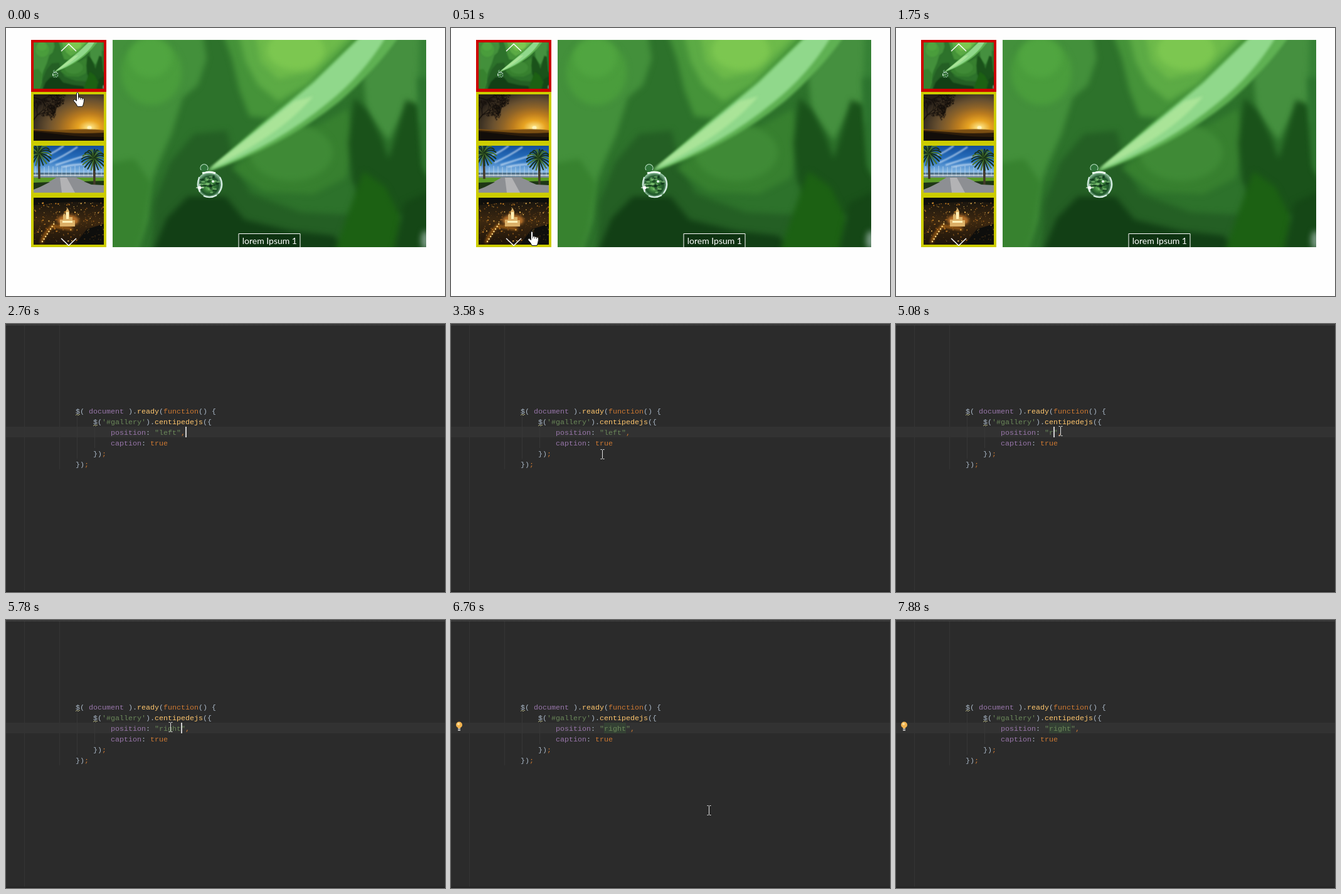
Recreate the animation shown at these times as an HTML page with a canvas. Size 700 px wide and 428 px high, loop 8000 ms.

```html
<!DOCTYPE html>
<html lang="en">
<head>
<meta charset="utf-8">
<title>Gallery position</title>
<style>
html, body { margin: 0; width: 700px; height: 428px; overflow: hidden; background: #fefefe; }
canvas { display: block; }
</style>
</head>
<body>
<canvas id="stage" width="700" height="428"></canvas>
<script>
const LOOP = 8000;
const stage = document.getElementById('stage').getContext('2d');

function layer(w, h, paint) {
  const canvas = document.createElement('canvas');
  canvas.width = w;
  canvas.height = h;
  paint(canvas.getContext('2d'));
  return canvas;
}

function fill(c, color, d) {
  c.fillStyle = color;
  c.fill(new Path2D(d));
}

function line(c, color, width, d) {
  c.strokeStyle = color;
  c.lineWidth = width;
  c.stroke(new Path2D(d));
}

function oval(c, color, x, y, rx, ry = rx) {
  c.fillStyle = color;
  c.beginPath();
  c.ellipse(x, y, rx, ry, 0, 0, 7);
  c.fill();
}

function blend(gradient, ...colors) {
  colors.forEach((color, i) => gradient.addColorStop(i / (colors.length - 1), color));
  return gradient;
}

function seeded(seed) {
  return () => (seed = (seed * 16807) % 2147483647) / 2147483647;
}

const leaf = layer(500, 331, c => {
  c.fillStyle = '#2d722b';
  c.fillRect(0, 0, 500, 331);
  c.filter = 'blur(5px)';
  fill(c, '#43903b', 'M-20-20H142L150 30 136 72 112 92 94 150 72 200 60 235 56 285 34 350H-20Z');
  fill(c, '#37822f', 'M-20 200L35 190 62 230 50 300 34 350H-20Z');
  oval(c, '#4a9d3c', 62, 52, 48, 52);
  oval(c, '#50a540', 60, 28, 34, 32);
  fill(c, '#245f24', 'M62 350L66 260 92 195 130 150 182 145 195 200 220 245 300 275 390 280 400 350Z');
  fill(c, '#123f15', 'M60 350L86 285 120 250 180 250 210 287 285 305 350 312 400 350Z');
  fill(c, '#459339', 'M172-20L190 30 202 80 218 122 250 125 330 60 430-20Z');
  fill(c, '#5cab45', 'M198-20L212 35 232 72 264 98 310 72 400-20Z');
  fill(c, '#6dba4a', 'M226-20L236 35 264 62 320 50 390-20Z');
  oval(c, '#7cc750', 292, 16, 46, 32);
  fill(c, '#37802f', 'M190 205L245 165 320 140 375 110 388 160 372 220 320 246 240 242Z');
  oval(c, '#3f8a36', 285, 180, 66, 45);
  fill(c, '#45903f', 'M440-20H520V95L470 105 440 160 405 115 400 60Z');
  fill(c, '#358035', 'M490-20H520V120L485 135Z');
  fill(c, '#1a521a', 'M376 165L385 92 406 112 430 160 440 190 452 152 468 95 486 105 494 200 520 250V310L470 280 435 285 405 270 382 225Z');
  fill(c, '#2c732e', 'M486 60H520V240L496 205Z');
  fill(c, '#1c6113', 'M350 350L378 270 400 210 435 235 462 290 455 350Z');
  fill(c, '#154716', 'M445 350L465 260 520 235V350Z');
  oval(c, '#7f9f8a', 499, 320, 7, 15);
  c.filter = 'blur(2px)';
  fill(c, '#5fb153', 'M150 211L236 135 320 65 400-10H460Q420 48 362 98 270 172 150 211Z');
  fill(c, '#90d88b', 'M152 209L236 139 320 69 396-5H436Q400 55 345 99 262 168 152 209Z');
  fill(c, '#aae498', 'M154 206L230 146 290 98 320 90Q266 154 154 206Z');
  c.filter = 'none';

  const glass = blend(c.createRadialGradient(153, 236, 2, 155, 231, 21),
    '#5fae55', '#367a38', '#1d5529', '#a9d8b8');
  oval(c, glass, 155, 231, 20.5);
  const random = seeded(9);
  for (let i = 0; i < 40; i++) {
    const a = random() * 7, r = random() * 15;
    oval(c, i % 2 ? 'rgba(8,45,22,.6)' : 'rgba(135,200,125,.6)',
      155 + Math.cos(a) * r, 231 + Math.sin(a) * r, 2 + random() * 1.5, 1.5);
  }
  line(c, '#d9efe6', 2, 'M138 219Q134 231 139 243M171 219Q178 232 169 245M145 249Q155 254 166 248');
  line(c, '#f1fff4', 3, 'M143 213Q154 209 164 213');
  oval(c, '#2f7439', 146, 205, 6);
  line(c, '#b9e1c4', 1.2, 'M141 208A6 6 0 1 1 151 208');
  oval(c, '#fff', 139, 236, 2.5);
  line(c, '#fff', 1, 'M133 236H145M139 230V242');
  oval(c, '#e8fff0', 160, 226, 2);
});

const sunset = layer(112, 75, c => {
  c.save();
  c.translate(89, 54);
  c.scale(1.5, 1);
  c.fillStyle = blend(c.createRadialGradient(0, 0, 1, 0, 0, 66),
    '#ffe98c', '#e8a422', '#bd7d1e', '#8f6428', '#6a5130', '#443726', '#241d17');
  c.fillRect(-70, -60, 100, 90);
  c.restore();
  oval(c, '#fff4b8', 89, 54, 3.5, 3);
  const random = seeded(31);
  function branch(x, y, angle, size) {
    const x2 = x + Math.cos(angle) * size, y2 = y + Math.sin(angle) * size;
    line(c, '#15100c', Math.max(.6, size / 10), `M${x} ${y}L${x2} ${y2}`);
    if (size < 3.5) return;
    for (const turn of [-0.55, 0.1, 0.6]) {
      branch(x2, y2, angle + turn + random() * 0.4 - 0.2, size * (0.6 + random() * 0.15));
    }
  }
  branch(-4, 46, -0.9, 16);
  branch(-3, 4, 0.3, 16);
  branch(16, -6, 0.6, 14);
  fill(c, '#7a4e12', 'M0 56Q30 59 60 57T112 58V75H0Z');
  fill(c, '#2c1c0a', 'M0 58Q28 60 52 62T112 62V75H0Z');
  fill(c, '#120d09', 'M0 60Q28 63 52 66T112 69V75H0Z');
});

const park = layer(112, 75, c => {
  c.fillStyle = blend(c.createLinearGradient(0, 0, 0, 46), '#134f9c', '#2a72c0', '#9cc8ec');
  c.fillRect(0, 0, 112, 75);
  c.filter = 'blur(1px)';
  line(c, 'rgba(230,243,255,.65)', 2.5,
    'M25 27Q48 17 70 2M35 31Q62 22 86 15M20 16Q35 10 48 0M46 34Q70 29 82 30');
  c.filter = 'none';
  fill(c, '#53738a', 'M0 43H112V51H0Z');
  fill(c, '#a9b9c6', 'M0 46H112V49H0Z');
  for (let x = 3; x < 112; x += 7) line(c, '#d9e6ef', .6, `M${x} ${32 + x % 3}V49`);
  fill(c, '#8d8f93', 'M0 50H112V75H0Z');
  fill(c, '#5c9a27', 'M0 51H36L24 58 0 62ZM68 51H112V60L84 58Z');
  fill(c, '#b3b3b5', 'M42 51H53L66 75H45Z');
  fill(c, '#1e3616', 'M0 59L26 58 10 66 0 70ZM80 57L112 56V63L92 62Z');
  function palm(x, y, size, base) {
    line(c, '#443a29', 3.5, `M${x} ${y}Q${x + 1} 40 ${x + 1} ${base}`);
    for (let i = 0; i < 21; i++) {
      const a = i * Math.PI * 2 / 21;
      const dx = Math.cos(a) * size, dy = Math.sin(a) * size * .8;
      line(c, i % 3 ? '#18331a' : '#4a742a', 2,
        `M${x} ${y}Q${x + dx * .6} ${y + dy - 4} ${x + dx} ${y + dy + 4}`);
    }
  }
  palm(8, 12, 21, 53);
  palm(96, 20, 20, 62);
});

const city = layer(112, 75, c => {
  c.fillStyle = blend(c.createLinearGradient(0, 0, 0, 75), '#14120e', '#3d2810', '#1d130a');
  c.fillRect(0, 0, 112, 75);
  fill(c, '#0e0e0c', 'M66 75L85 50 112 42V75ZM0 0H112V9Q70 3 0 12Z');
  const random = seeded(77);
  const lights = ['#8a541b', '#d88926', '#ffc559', '#6b451b'];
  for (let i = 0; i < 260; i++) {
    const x = random() * 112, y = 8 + random() * 62;
    c.globalAlpha = x > 70 && y > 45 ? .3 : .85;
    oval(c, lights[i % 4], x, y, .3 + random() * .9);
  }
  c.globalAlpha = 1;
  c.filter = 'blur(2px)';
  line(c, '#d47d1b', 3, 'M12 72Q17 57 32 43M30 45L62 50');
  oval(c, '#b5702a', 55, 36, 17, 9);
  c.filter = 'none';
  fill(c, '#dcb067', 'M42 46V35H47V28L49 24 51 29V22L54 16 57 22V31H62V36H66V46Z');
  fill(c, '#fff0b7', 'M52 23H56V34H52ZM46 37H62V40H46Z');
  for (let i = 0; i < 8; i++) oval(c, '#ffdc83', 14 + i * 2.6, 70 - i * 4, 1.2);
});

const gallery = layer(700, 428, c => {
  c.fillStyle = '#fefefe';
  c.fillRect(0, 0, 700, 428);
  c.drawImage(leaf, 170, 19);
  [leaf, sunset, park, city].forEach((photo, i) => {
    const y = 19 + i * 82.75;
    const top = Math.round(y + 3.8), bottom = Math.round(y + 78.4);
    c.fillStyle = i ? '#cccc00' : '#cc0000';
    c.fillRect(40, Math.round(y), 120, 83);
    c.drawImage(photo, 44, top, 112, bottom - top);
  });
  line(c, '#fff', 1.4, 'M88 37L100 25.5 112 37M88 336L100 347.5 112 336');
  c.fillStyle = 'rgba(0,0,0,.2)';
  c.fillRect(371, 328, 98, 22);
  line(c, '#fff', 1, 'M371 350V328.5H469V350');
  c.fillStyle = '#fff';
  c.font = '14px Lato, sans-serif';
  c.fillText('lorem Ipsum 1', 376.7, 345);
});

const colors = { w: '#a9b7c6', p: '#9876aa', y: '#ffc66d', o: '#cc7832', g: '#6a8759' };

// Each token is a colour key followed by its text.
function code(row, column, ...tokens) {
  let x = 111 + column * 7;
  stage.font = '11.667px "Liberation Mono", monospace';
  for (const token of tokens) {
    stage.fillStyle = colors[token[0]];
    stage.fillText(token.slice(1), x, 143 + row * 17);
    x += (token.length - 1) * 7;
  }
}

function rect(color, x, y, w, h) {
  stage.fillStyle = color;
  stage.fillRect(x, y, w, h);
}

// Time, shape, left, top
const pointers = [
  [0, 'hand', 107, 102], [120, 'hand', 109, 190], [240, 'hand', 113, 264],
  [380, 'hand', 118, 305], [510, 'hand', 122, 324], [660, 'hand', 124, 333],
  [800, 'arrow', 146, 359], [920, 'arrow', 148, 366], [1040, 'arrow', 148, 368],
  [1630, 'arrow', 120, 399], [1750],
  [3310, 'beam', 203, 338], [3460, 'beam', 220, 270], [3580, 'beam', 238, 200],
  [3730, 'beam', 250, 180], [3850, 'beam', 257, 167], [3990, 'beam', 259, 163],
  [6340, 'beam', 300, 200], [6460, 'beam', 373, 266], [6600, 'beam', 407, 295],
  [6760, 'beam', 408, 296], [6920, 'beam', 356, 179], [7060, 'beam', 340, 174],
  [7190, 'beam', 325, 166], [7580, 'beam', 309, 197], [7730, 'beam', 271, 341], [7880]
];
const carets = [
  [2760, 286], [3310], [3850, 286], [3990, 265], [4130, 272], [5080, 251], [5220, 258],
  [5480, 265], [5630, 272], [5780, 279], [6760], [7190, 279], [7730]
];
const words = [
  [2760, 'left'], [5080, 'r'], [5220, 'ri'], [5480, 'rig'], [5630, 'righ'], [5780, 'right']
];

const latest = (keys, t) => keys.findLast(key => key[0] <= t);

const shapes = {
  hand: 'M5.5 2Q7-.5 8.5 2V9Q10 7.7 11.5 9.3 13 8.5 14.3 10.2 16.5 9.6 17.4 11.7V15Q17 19 15 23.4H7Q5 18.5 1 14.8 0 12 2.5 12L5.5 14.5Z',
  arrow: 'M.5.5V16L4 12.7 6.5 18.5 9 17.5 6.6 11.8H11.5Z',
  beam: 'M.5.5H2.5L3.5 1.5 4.5.5H6.5M3.5 1.5V14.5M.5 15.5H2.5L3.5 14.5 4.5 15.5H6.5'
};

function drawPointer([, shape, x, y]) {
  if (!shape) return;
  stage.save();
  stage.translate(x, y);
  if (shape === 'beam') {
    line(stage, '#e2e2e2', 1, shapes.beam);
  } else {
    fill(stage, '#fff', shapes[shape]);
    line(stage, '#111', 1, shapes[shape]);
    if (shape === 'hand') line(stage, '#111', .8, 'M8.5 9V12M11.5 9.5V12.5M14.4 10.5V13');
  }
  stage.restore();
}

function drawEditor(t) {
  rect('#2b2b2b', 0, 0, 700, 428);
  for (let x = 0; x < 700; x += 2) rect('#666', x, 1, 1, 1);
  rect('#232323', 0, 426, 700, 2);
  rect('#323232', 0, 164, 700, 17);
  rect('#343434', 29, 2, 1, 424);
  rect('#343434', 85, 2, 1, 230);
  rect('#373737', 113, 147, 1, 68);
  rect('#373737', 141, 164, 1, 34);
  if (t >= 4130 && t < 5080) rect('#214283', 244, 164, 29, 17);
  if (t >= 6600) {
    rect('#344134', 244, 164, 35, 17);
    oval(stage, '#f2b34f', 13, 167.5, 5);
    rect('#f2b34f', 11, 171, 4, 2);
    oval(stage, '#ffdf9c', 12, 166, 2);
    rect('#b4b4b4', 11, 173, 4, 4);
    rect('#666', 11, 174, 4, 1);
  }
  code(0, 0, 'w$( ', 'pdocument', 'w ).', 'yready', 'w(', 'ofunction', 'w() {');
  code(1, 4, 'w$(', "g'#gallery'", 'w).', 'ycentipedejs', 'w({');
  code(2, 8, 'pposition', 'w: ', `g"${latest(words, t)[1]}"`, 'o,');
  code(3, 8, 'pcaption', 'w: ', 'otrue');
  code(4, 4, 'w})', 'o;');
  code(5, 0, 'w})', 'o;');
  line(stage, '#aeae80', 1, 'M111 146L113 144 115 146 117 144 118 145M139 163L141 161 143 163 145 161 146 162');
  const caret = latest(carets, t)[1];
  if (caret) rect('#cfcfcf', caret, 164, 2, 17);
}

function frame(now) {
  const t = now % LOOP;
  if (t < 2760) stage.drawImage(gallery, 0, 0);
  else drawEditor(t);
  drawPointer(latest(pointers, t));
  requestAnimationFrame(frame);
}
requestAnimationFrame(frame);
</script>
</body>
</html>
```
